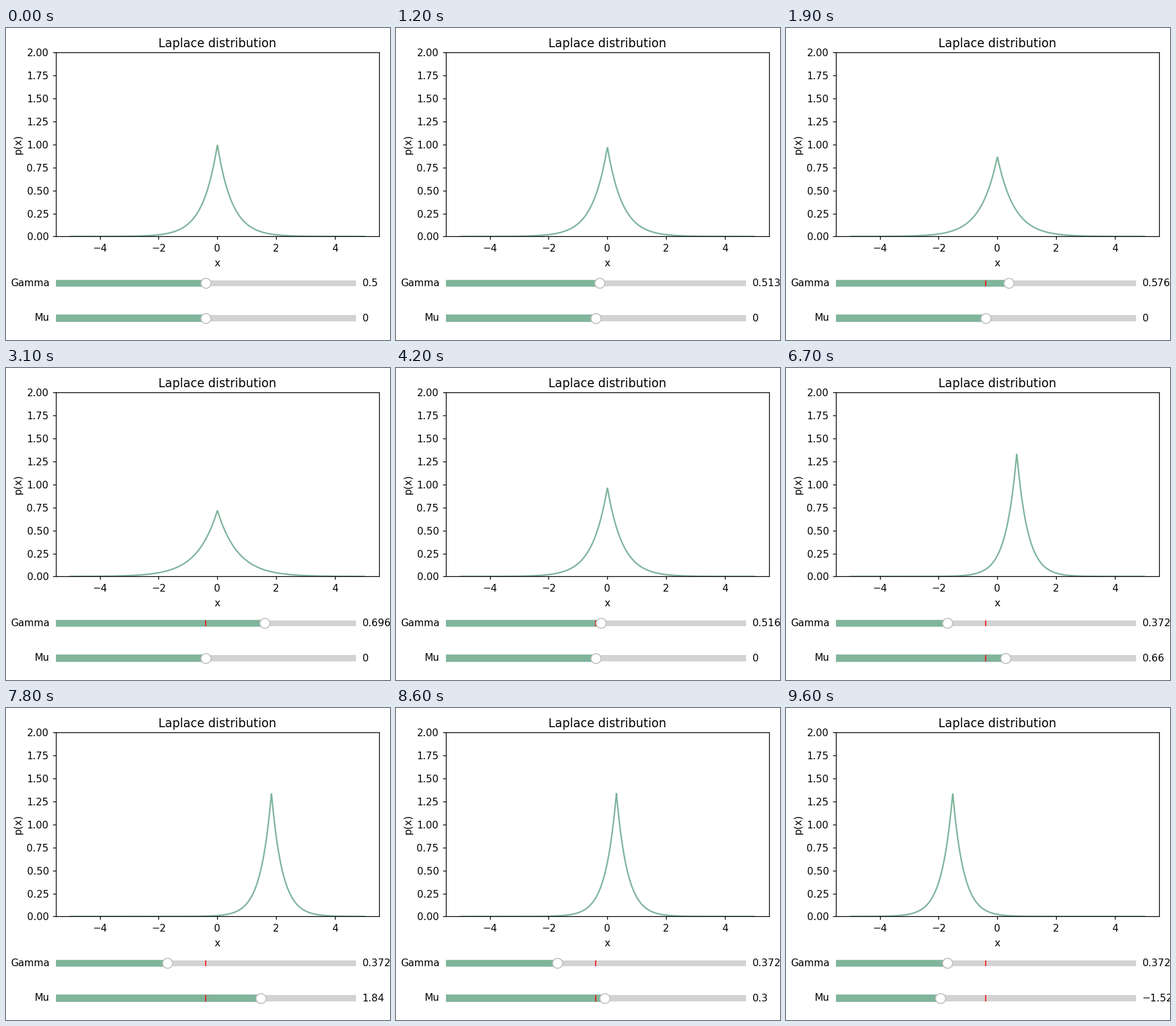
Write a matplotlib script that moves like this. It is 600 by 487 pixels and loops after 9700 ms.

```python
import numpy as np
import matplotlib.pyplot as plt
from matplotlib.animation import FuncAnimation
from matplotlib.widgets import Slider

W, H, DPI = 600, 487, 112
STEP = 100      # ms per frame
FRAMES = 97
GREEN = "#80b59c"

# Each drag: first moving frame, then (mouse step, slider value) key points
GAMMA = 8, [(0, 0.5), (9, 0.576), (18, 0.7), (27, 0.516), (35, 0.372)]
MU = 63, [(0, 0), (4, 0.66), (11, 1.84), (18, -0.04), (21, -1.33), (23, -1.52)]

# Frames in which the mouse rests
RESTS = {9, 10, 15, 21, 30, 32, 38, 41, 44, 48,
         64, 68, 70, 76, 77, 82, 85, 88, 92, 94, 95}


def smooth(s, points):
    """Cubic curve through the points, flat at the ends and turning points."""
    t, v = np.array(points, float).T
    rate = np.diff(v) / np.diff(t)
    slope = np.zeros_like(v)
    for i, (a, b) in enumerate(zip(rate, rate[1:]), 1):
        if a * b > 0:
            slope[i] = 2 * a * b / (a + b)
    s = min(s, t[-1])
    i = min(np.searchsorted(t, s, side="right"), len(t) - 1) - 1
    dt = t[i + 1] - t[i]
    u = (s - t[i]) / dt
    ease = u * u * (3 - 2 * u)
    return (v[i] + (v[i + 1] - v[i]) * ease
            + dt * u * (1 - u) * (slope[i] * (1 - u) - slope[i + 1] * u))


def value_at(drag, frame):
    start, points = drag
    moves = sum(f not in RESTS for f in range(start, frame + 1))
    return smooth(moves, points)


def laplace(x, mu, gamma):
    return np.exp(-np.abs(x - mu) / gamma) / (2 * gamma)


def add_axes(left, top, width, height):
    """Axes placed in pixels from the top left corner."""
    return fig.add_axes([left / W, 1 - (top + height) / H, width / W, height / H])


def add_slider(label, center, low, high, start):
    bar = Slider(add_axes(77.5, center - 9.5, 469, 19), label, low, high,
                 valinit=start, color=GREEN)
    bar.drawon = False
    return bar


fig = plt.figure(figsize=((W + 1e-3) / DPI, (H + 1e-3) / DPI), dpi=DPI,
                 facecolor="white")

ax = add_axes(77.8, 38.4, 505, 287)
ax.set(xlim=(-5.5, 5.5), ylim=(0, 2))
ax.set_title("Laplace distribution", pad=5.4)
ax.set_xlabel("x", labelpad=5.1)
ax.set_ylabel("p(x)")
ax.tick_params(axis="x", pad=4.1)
x = np.linspace(-5, 5, 1000)
curve, = ax.plot(x, laplace(x, 0, 0.5), color=GREEN, lw=1.5)

gamma_bar = add_slider("Gamma", 398.4, 0, 1, 0.5)
mu_bar = add_slider("Mu", 452.9, -5, 5, 0)


def update(frame):
    gamma, mu = value_at(GAMMA, frame), value_at(MU, frame)
    gamma_bar.set_val(gamma)
    mu_bar.set_val(mu)
    curve.set_ydata(laplace(x, mu, gamma))
    return [curve]


anim = FuncAnimation(fig, update, frames=FRAMES, interval=STEP,
                     repeat=True, repeat_delay=0, blit=False)
plt.show()
```
